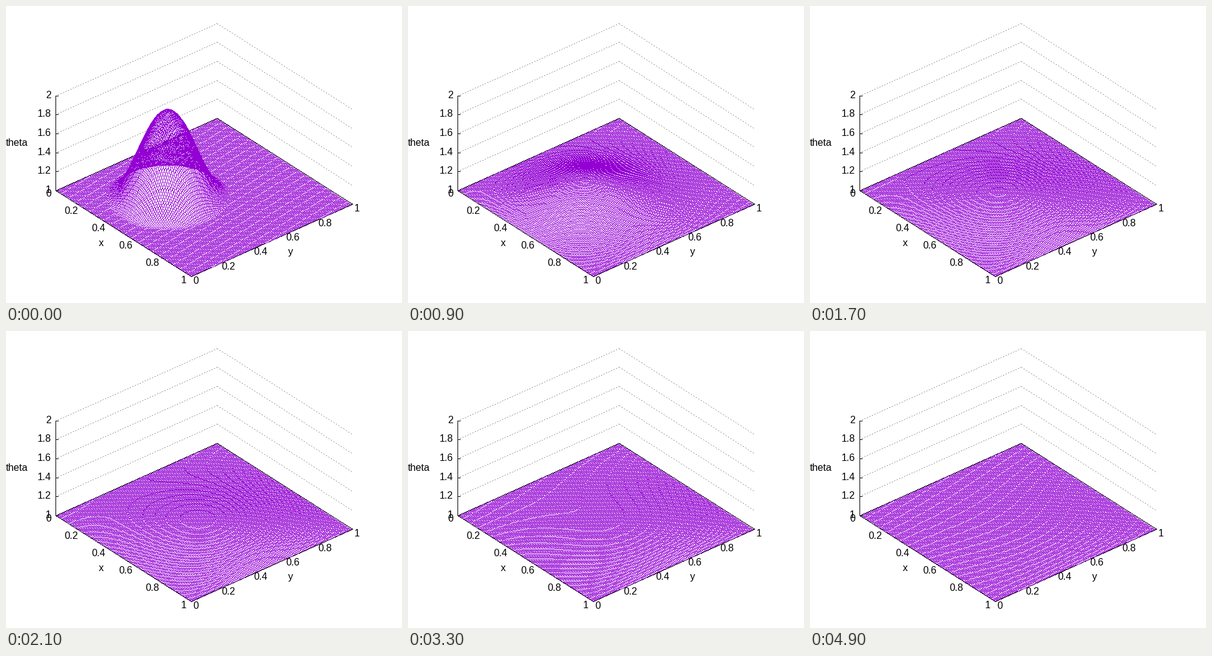
A matplotlib script that plays this animation: 640x480 px, repeating every 5000 ms.

```python
import numpy as np
import matplotlib.pyplot as plt
from matplotlib.animation import FuncAnimation

W, H, DPI = 640, 480, 100
FRAMES, INTERVAL = 50, 100
PURPLE, BLACK, GREY = (148, 0, 211), (0, 0, 0), (160, 160, 160)

# Diffusion and drift per frame, in plot units
DIFF, DRIFT_X, DRIFT_Y = 0.0022, 0.012, 0.003
CENTRE, RADIUS, PEAK = (0.385, 0.37), 0.295, 0.915

CELLS = 120
nodes = (np.arange(CELLS) + 0.5) / CELLS
gx, gy = np.meshgrid(nodes, nodes, indexing="ij")
dist = np.hypot(gx - CENTRE[0], gy - CENTRE[1])
start = np.where(dist < RADIUS, PEAK / 2 * (1 + np.cos(np.pi * dist / RADIUS)), 0)


def spread(drift, t):
    """Advection-diffusion over time t on [0, 1] with fixed ends."""
    modes = np.arange(1, CELLS) * np.pi
    sines = np.sin(np.outer(nodes, modes))
    k = drift / (2 * DIFF)
    decay = np.exp(-DIFF * (modes**2 + k**2) * t)
    tilt = np.exp(k * (nodes[:, None] - nodes[None, :]))
    return tilt * ((sines * decay) @ sines.T) * 2 / CELLS


def height(t):
    if t == 0:
        return start
    return spread(DRIFT_X, t) @ start @ spread(DRIFT_Y, t).T


TURN = np.radians(50)
COS, SIN = np.cos(TURN), np.sin(TURN)


def project(x, y, z=0.0):
    x, y = np.asarray(x) - 0.5, np.asarray(y) - 0.5
    px = 320 + 340 * (x * COS + y * SIN)
    py = 309 + 182 * (x * SIN - y * COS) - 153 * np.asarray(z)
    return px, py


def draw_segments(img, x0, y0, x1, y1, color, dash=None):
    """Plot hard-edged one-pixel segments between rounded end points."""
    x0, y0, x1, y1 = (np.rint(np.ravel(v)).astype(int) for v in (x0, y0, x1, y1))
    dx, dy = x1 - x0, y1 - y0
    length = np.maximum(np.maximum(abs(dx), abs(dy)), 1)
    step = np.arange(length.max() + 1)
    frac = step / length[:, None]
    keep = frac <= 1
    if dash:
        keep &= step % dash[1] < dash[0]
    px = np.floor(x0[:, None] + dx[:, None] * frac + 0.5).astype(int)
    py = np.floor(y0[:, None] + dy[:, None] * frac + 0.5).astype(int)
    img[py[keep], px[keep]] = color


def line(img, a, b, color, dash=None):
    draw_segments(img, *project(*a), *project(*b), color, dash)


def make_backdrop():
    img = np.full((H, W, 3), 255, np.uint8)
    for z in (0.2, 0.4, 0.6, 0.8, 1):
        line(img, (0, 0, z), (0, 1, z), GREY, (2, 4))
        line(img, (0, 1, z), (1, 1, z), GREY, (2, 4))
    corners = [(0, 0), (1, 0), (1, 1), (0, 1), (0, 0)]
    for a, b in zip(corners, corners[1:]):
        line(img, a, b, BLACK)
    line(img, (0, 0, 0), (0, 0, 1), BLACK)
    for z in np.linspace(0, 1, 6):
        px, py = project(0, 0, z)
        draw_segments(img, px, py, px + 4, py, BLACK)
    return img


backdrop = make_backdrop()


def render(frame):
    img = backdrop.copy()
    px, py = project(gx, gy, height(frame))
    for a, b in ((np.s_[:-1, :], np.s_[1:, :]), (np.s_[:, :-1], np.s_[:, 1:])):
        draw_segments(img, px[a], py[a], px[b], py[b], PURPLE)
    return img


fig = plt.figure(figsize=(W / DPI, H / DPI), dpi=DPI, facecolor="white")
ax = fig.add_axes([0, 0, 1, 1])
picture = ax.imshow(render(0), extent=(0, W, H, 0), interpolation="nearest", aspect="auto")
ax.set(xlim=(0, W), ylim=(H, 0))
ax.axis("off")


def label(x, y, text, ha="center"):
    ax.text(x, y, text, ha=ha, va="center_baseline", family="Liberation Sans",
            size=16 * 72 / DPI, color="black")


for v in np.linspace(0, 1, 6):
    tx, ty = project(v, 0)
    label(tx - 7.5, ty + 4.5, f"{v:.1g}", "right")
    tx, ty = project(1, v)
    label(tx + 8, ty + 6, f"{v:.1g}")
    tx, ty = project(0, 0, v)
    label(73, ty - 2, f"{1 + v:.2g}", "right")
label(154, 382, "x")
label(460, 396, "y")
label(-0.5, 219.5, "theta", "left")


def update(frame):
    picture.set_data(render(frame))
    return (picture,)


anim = FuncAnimation(fig, update, frames=FRAMES, interval=INTERVAL, repeat=True, repeat_delay=0, blit=False)
plt.show()
```
